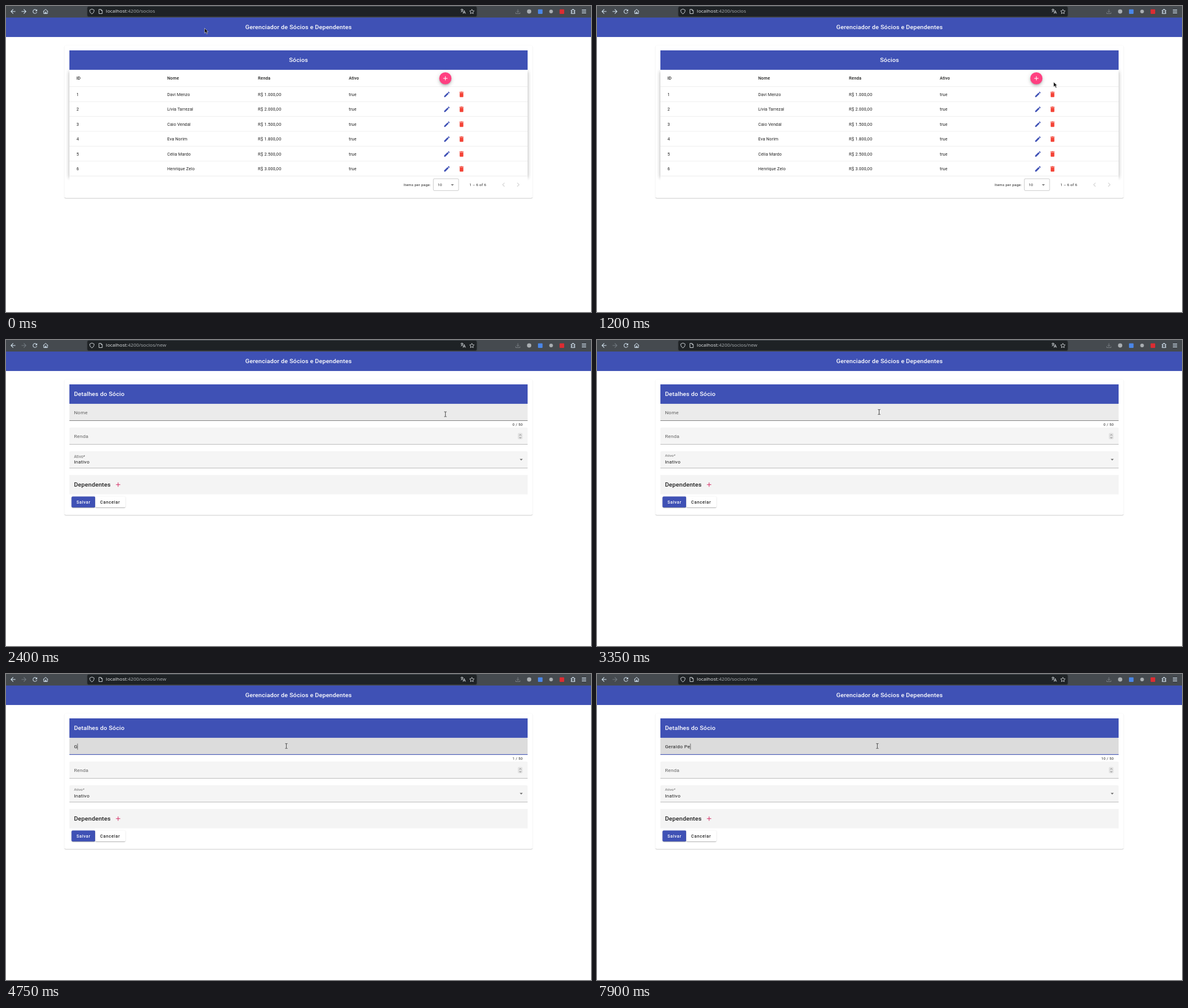
Animation of 959x503 px, one loop 8 s. Source, as an HTML page:

```html
<!DOCTYPE html>
<html lang="pt">
<head>
<meta charset="utf-8">
<title>Gerenciador de Sócios e Dependentes</title>
<style>
html, body { margin: 0; width: 959px; height: 503px; overflow: hidden; background: #fff; }
#stage { position: absolute; left: 0; top: 0; width: 1920px; height: 1008px; transform-origin: 0 0;
  transform: scale(.499479); overflow: hidden; font: 14px/20px Roboto, sans-serif; color: rgba(0,0,0,.87); }
#stage div, #stage svg { position: absolute; }
#stage svg { overflow: visible; }
.view { left: 0; top: 0; }
.t { white-space: pre; letter-spacing: .25px; }
.h { font-size: 20px; font-weight: 500; }
.w { color: #fff; }
.b { font-weight: 500; }
.s { font-size: 12px; letter-spacing: .4px; }
.f { font-size: 16px; letter-spacing: .5px; }
.m { color: rgba(0,0,0,.6); }
.btn { font-weight: 500; letter-spacing: 1.25px; }
.url { font: 16px/20px "Noto Sans", sans-serif; color: #a5a9ac; letter-spacing: 0; }
.url b { font-weight: 400; color: #dcdee0; }
.card { background: #fff; border-radius: 4px;
  box-shadow: 0 2px 1px -1px rgba(0,0,0,.2), 0 1px 1px rgba(0,0,0,.14), 0 1px 3px rgba(0,0,0,.12); }
.z8 { background: #fff;
  box-shadow: 0 5px 5px -3px rgba(0,0,0,.2), 0 8px 10px 1px rgba(0,0,0,.14), 0 3px 14px 2px rgba(0,0,0,.12); }
.fab { border-radius: 50%; background: #ff4081;
  box-shadow: 0 3px 5px -1px rgba(0,0,0,.2), 0 6px 10px rgba(0,0,0,.14), 0 1px 18px rgba(0,0,0,.12); }
.raised { border-radius: 4px;
  box-shadow: 0 3px 1px -2px rgba(0,0,0,.2), 0 2px 2px rgba(0,0,0,.14), 0 1px 5px rgba(0,0,0,.12); }
.sel { box-sizing: border-box; border: 1px solid rgba(0,0,0,.38); border-radius: 4px; }
.fill { background: #f5f5f5; border-radius: 4px 4px 0 0; }
#caret { display: inline-block; position: absolute; width: 1px; height: 20px; background: #000; }
</style>
</head>
<body>
<div id="stage"></div>
<script>
const BLUE = '#3f51b5', PALE = '#d3e3f1';
const stage = document.getElementById('stage');
const $ = id => document.getElementById(id);

// Layout helpers, in page pixels
const box = (x, y, w, h, bg = '', cls = '', id = '') =>
  `<div id="${id}" class="${cls}" style="left:${x}px;top:${y}px;width:${w}px;height:${h}px;${bg && 'background:' + bg}"></div>`;
const shift = { l: 0, c: -50, r: -100 };
const text = (x, y, s, cls = '', at = 'l', id = '') =>
  `<div id="${id}" class="t ${cls}" style="left:${x}px;top:${y - 10}px;transform:translateX(${shift[at]}%)">${s}</div>`;
const icon = (d, x, y, size, color, id = '') =>
  `<svg id="${id}" viewBox="0 0 24 24" width="${size}" height="${size}" style="left:${x - size / 2}px;top:${y - size / 2}px"><path d="${d}" fill="${color}"/></svg>`;
const line = (d, x, y, color = PALE, width = 2) =>
  `<svg width="1" height="1" style="left:${x}px;top:${y}px"><path d="${d}" fill="none" stroke="${color}" stroke-width="${width}" stroke-linejoin="round"/></svg>`;
const dot = (x, size, color, radius) =>
  `<div style="left:${x - size / 2}px;top:${18 - size / 2}px;width:${size}px;height:${size}px;border-radius:${radius};background:${color}"></div>`;

const path = {
  back: 'M20 11H7.83l5.59-5.59L12 4l-8 8 8 8 1.41-1.41L7.83 13H20z',
  next: 'M12 4l-1.41 1.41L16.17 11H4v2h12.17l-5.58 5.59L12 20l8-8z',
  reload: 'M17.65 6.35A8 8 0 1 0 19.73 14h-2.08A6 6 0 1 1 12 6c1.66 0 3.14.69 4.22 1.78L13 11h7V4z',
  add: 'M19 13h-6v6h-2v-6H5v-2h6V5h2v6h6z',
  edit: 'M3 17.25V21h3.75L17.81 9.94l-3.75-3.75zM20.71 7.04c.39-.39.39-1.02 0-1.41l-2.34-2.34c-.39-.39-1.02-.39-1.41 0l-1.83 1.83 3.75 3.75z',
  bin: 'M6 19c0 1.1.9 2 2 2h8c1.1 0 2-.9 2-2V7H6zM19 4h-3.5l-1-1h-5l-1 1H5v2h14z',
  left: 'M15.41 7.41L14 6l-6 6 6 6 1.41-1.41L10.83 12z',
  right: 'M10 6L8.59 7.41 13.17 12l-4.58 4.59L10 18l6-6z',
  drop: 'M7 9.5h10l-5 5z',
  star: 'M12 4l2.5 5.3 5.7.7-4.2 4 1.1 5.8L12 17l-5.1 2.8L8 14l-4.2-4 5.7-.7z'
};

const browser =
  box(0, 0, 1920, 38, '#454a4f') +
  box(267, 2, 1278, 32, '#1e2225', 'raised') +
  icon(path.back, 23, 18, 24, PALE) + icon(path.next, 59, 18, 24, PALE, 'next') +
  icon(path.reload, 95, 18, 22, PALE) +
  line('M-8 0L0-7L8 0M-6-1V7H6V-1M-1.5 7V2H1.5V7', 130, 18) +
  line('M0-8L7-5V-1Q6 5 0 8Q-6 5-7-1V-5Z', 282, 18, '#c3c8cc') +
  line('M-5-7H2L6-3V7H-5ZM2-7V-3H6', 310, 18, '#c3c8cc') +
  text(328, 17, '', 'url', 'l', 'url') +
  line('M-8-5H1M-3.500-8V-5M-7 3Q-1 0 0-5M-6-3Q-4 1 0 2M0 8L4-2L8 8M1.500 5H6.500', 1500, 17, '#c3c8cc') +
  line('M0-7L2.300-2.300 7.500-1.700 3.700 2 4.600 7 0 4.600-4.600 7-3.700 2-7.500-1.700-2.300-2.300Z', 1529, 18, '#d5d9dc', 1.7) +
  line('M0-7V3M-4-1L0 3L4-1M-7 3V7H7V3', 1680, 18, '#777d82') +
  dot(1717, 14, '#a9aeb2', '50%') + dot(1753, 15, '#4a86e8', '2px') +
  dot(1789, 12, '#a9aeb2', '50%') + dot(1824, 15, '#dd2c32', '2px') +
  line('M-6-4H-2V-7H2V-4H6V0H3V3H6V7H-6V3H-3V0H-6Z', 1861, 18) +
  line('M-7-5H7M-7 0H7M-7 5H7', 1897, 18) +
  box(0, 38, 1920, 64, BLUE) +
  text(960, 70, 'Gerenciador de Sócios e Dependentes', 'h w', 'c');

const cols = [231, 529, 827, 1125];
const members = [
  ['Davi Menzo', '1.000'], ['Lívia Tarrezal', '2.000'], ['Caio Vendal', '1.500'],
  ['Eva Norim', '1.800'], ['Célia Mardo', '2.500'], ['Henrique Zelo', '3.000']
];
const row = ([name, pay], i) => {
  const y = 290.5 + 49 * i;
  return [i + 1, name, `R$ ${pay},00`, 'true'].map((s, k) => text(cols[k], y, s)).join('') +
    icon(path.edit, 1446.5, y, 24, BLUE) + icon(path.bin, 1494.500, y, 24, '#f44336') +
    box(208, 265 + 49 * i, 1504, 1, 'rgba(0,0,0,.12)');
};
const list = `<div id="list" class="view">` +
  box(192, 130, 1536, 502, '', 'card') +
  box(208, 210, 1504, 350, '', 'z8') +
  box(208, 560, 1504, 56, '#fff') +
  box(208, 146, 1504, 64, BLUE) + text(960, 178, 'Sócios', 'h w', 'c') +
  ['ID', 'Nome', 'Renda', 'Ativo'].map((s, k) => text(cols[k], 237.5, s, 'b')).join('') +
  members.map(row).join('') +
  box(1422, 218, 40, 40, '', 'fab') + icon(path.add, 1442, 238, 24, '#fff') +
  box(1422, 218, 40, 40, '#fff', 'fab', 'ripple') +
  text(1394, 588, 'Items per page:', 's', 'r') +
  box(1401.5, 568, 84, 40, '', 'sel') + text(1417, 589, '10', 's') +
  icon(path.drop, 1464.5, 588.5, 24, 'rgba(0,0,0,.54)') +
  text(1521, 588, '1 – 6 of 6', 's') +
  icon(path.left, 1633, 588, 28, 'rgba(0,0,0,.16)') + icon(path.right, 1681, 588, 28, 'rgba(0,0,0,.16)') +
  '</div>';

const field = (y, id) => box(208, y, 1504, 56, '', 'fill', id) +
  box(208, y + 55, 1504, 1, 'rgba(0,0,0,.45)', '', id + 'Line');
const form = `<div id="form" class="view">` +
  box(192, 130, 1536, 446, '', 'card') +
  box(208, 146, 1504, 64, BLUE) + text(223, 178, 'Detalhes do Sócio', 'h w') +
  field(210, 'name') + text(223, 238.5, 'Nome', 'f m', 'l', 'label') +
  text(223, 238.5, '<span id="typed"></span><span id="caret"></span>', 'f') +
  text(1696, 278, '', 's', 'r', 'count') +
  field(288, 'pay') + text(223, 316.5, 'Renda', 'f m') +
  box(1680, 306, 15, 21, '#e2e2e2', 'raised flat') +
  line('M-3-3L0-6L3-3M-3 3L0 6L3 3', 1687.500, 316.5, '#666', 1.6) +
  field(366, 'state') + text(223, 380, 'Ativo*', 's m', 'l', 'ativo') +
  text(223, 402, 'Inativo', 'f') + icon(path.drop, 1691, 393.5, 24, 'rgba(0,0,0,.6)') +
  box(208, 444, 1504, 64, '#f4f4f4') + text(223, 475.5, 'Dependentes', 'h') +
  icon(path.add, 367.5, 475.5, 24, '#d6336a') +
  box(215, 515, 78, 36, BLUE, 'raised') + text(231, 532.5, 'Salvar', 'btn w') +
  box(293, 515, 99, 36, '#fff', 'raised') + text(309, 532.5, 'Cancelar', 'btn') +
  '</div>';

const pointer = (id, inner) => `<svg id="${id}" width="1" height="1" style="left:0;top:0">${inner}</svg>`;
const pointers =
  pointer('arrow', '<path d="M0 0V16L4 12.500 7 19 10 17.700 7 11.500H12Z" fill="#111" stroke="#fff" stroke-width="1"/>') +
  pointer('hand', '<path d="M-2 1Q0-2 2 1V6Q9 6 10 9V13Q9 16 7 17H-2Q-4 13-7 10Q-6 7-2 9Z" fill="#111" stroke="#fff" stroke-width="1"/>') +
  pointer('beam', '<path d="M-4-8H-1Q0-8 0-7Q0-8 1-8H4M0-7V7M-4 8H-1Q0 8 0 7Q0 8 1 8H4" fill="none" stroke="#fff" stroke-width="3"/><path d="M-4-8H-1Q0-8 0-7Q0-8 1-8H4M0-7V7M-4 8H-1Q0 8 0 7Q0 8 1 8H4" fill="none" stroke="#333" stroke-width="1.8"/>');

stage.innerHTML = browser + list + form + pointers;
document.querySelector('.flat').style.boxShadow = 'none';

// Pointer stops: time, x, y (stage pixels)
const stops = [
  [0, 325.5, 36.5], [1000, 750, 125], [1200, 748.5, 125], [1250, 744, 125],
  [1300, 738, 124.7], [1350, 734.5, 124.5], [1750, 720.7, 121.5],
  [2400, 720.3, 122], [2900, 625, 122], [3000, 533.5, 121.7],
  [3200, 483.5, 120.5], [3350, 462.5, 118.3], [3600, 459.6, 118.3]
];
const keys = [4750, 4900, 5400, 5800, 6050, 6150, 6700, 6900, 7500, 7900];
const word = 'Geraldo Pe';

function pointerAt(t) {
  if (t >= 500 && t < 1000) {
    const u = (Math.floor(t / 50) - 9) / 11, e = u * u * (3 - 2 * u);
    const [a, b] = stops;
    return [a[1] + (b[1] - a[1]) * e, a[2] + (b[2] - a[2]) * e];
  }
  return stops.filter(s => s[0] <= t).pop().slice(1);
}

const show = (id, on) => { $(id).style.visibility = on ? 'visible' : 'hidden'; };

function draw(t) {
  const open = t >= 2400, focus = t >= 3600, active = t >= 3850;
  const n = keys.filter(k => k <= t).length;
  $('list').style.display = open ? 'none' : 'block';
  $('form').style.display = open ? 'block' : 'none';
  $('next').style.opacity = open ? .3 : 1;
  $('url').innerHTML = '<b>localhost</b>:4200/socios' + (open ? '/new' : '');
  $('ripple').style.opacity = t >= 2200 ? .24 : t >= 1750 ? .05 : 0;

  $('name').style.background = focus ? '#dcdcdc' : '#ebebeb';
  const rule = $('nameLine').style;
  rule.background = active ? BLUE : 'rgba(0,0,0,.87)';
  rule.top = active ? '264px' : '265px';
  rule.height = active ? '2px' : '1px';
  $('ativo').style.top = t < 2550 ? '374px' : '370px';
  $('ativo').style.fontSize = t < 2550 ? '12.8px' : '12px';

  $('label').style.display = n ? 'none' : 'block';
  $('typed').textContent = word.slice(0, n);
  $('count').textContent = n + ' / 50';
  $('caret').style.display = focus && !(t >= 7200 && t < 7500) ? 'inline-block' : 'none';

  const [x, y] = pointerAt(t), kind = open ? 'beam' : t >= 1750 ? 'hand' : 'arrow';
  for (const id of ['arrow', 'hand', 'beam']) show(id, id === kind);
  $(kind).style.transform = `translate(${x * 1920 / 959}px, ${y * 1920 / 959}px)`;
}

const start = performance.now();
function tick() {
  draw((performance.now() - start) % 8000);
  requestAnimationFrame(tick);
}
tick();
</script>
</body>
</html>
```
